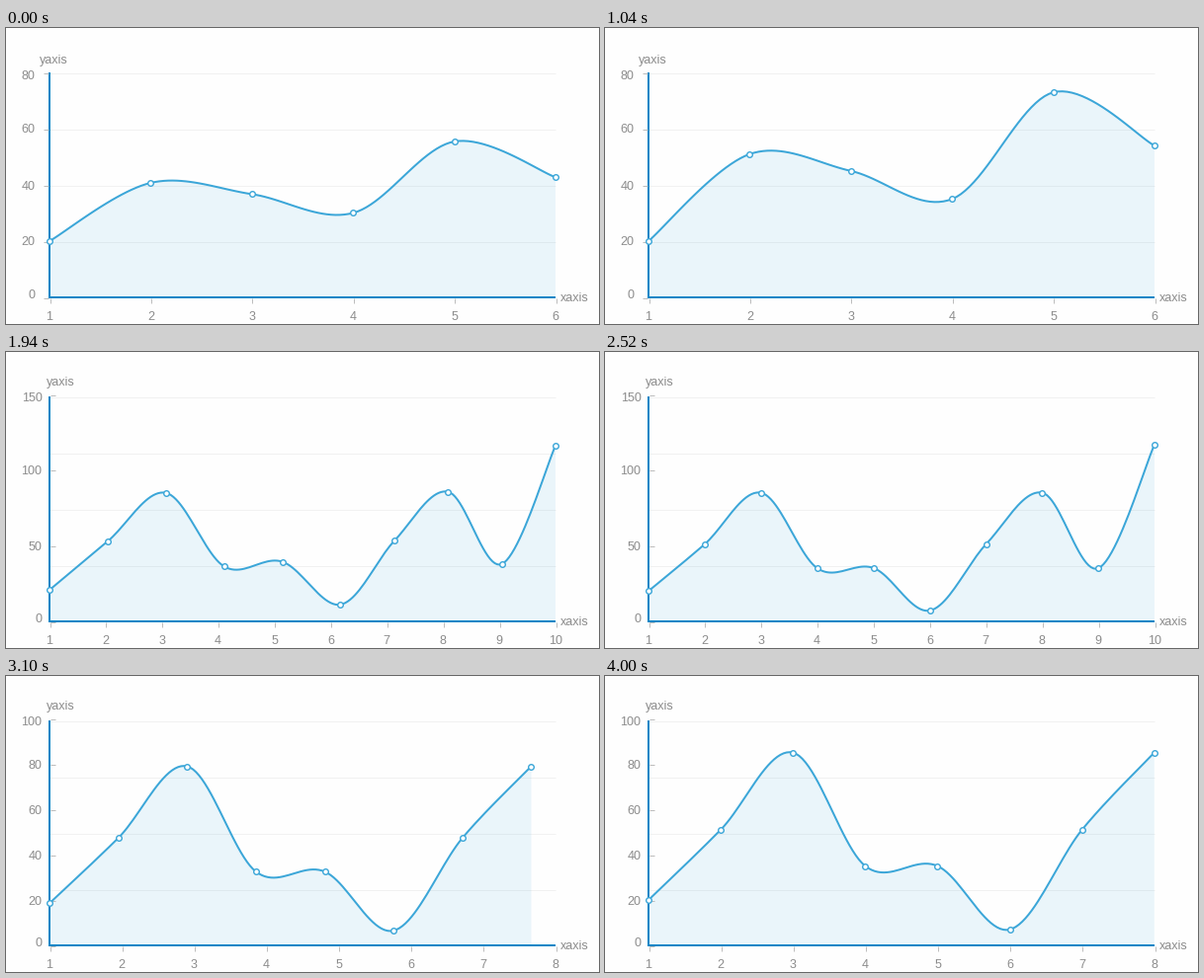
Recreate the animation shown at these times as a matplotlib script. Size 600 by 300 pixels, loop 5380 ms.

```python
import numpy as np
import matplotlib.pyplot as plt
from matplotlib.animation import FuncAnimation

W, H, DPI = 600, 300, 100
LOOP, INTERVAL = 5380, 20
LEFT, RIGHT, BASE = 44, 556, 273
STEP, DURATION = 148, 1338  # ms between redraws, ms of one transition
LINE, AXIS, TEXT, TICK, GRID = "#3ba6d8", "#0a86c6", "#8c8c8c", "#bdbdbd", "#f1f1f1"

# values, axis top value, label step, pixel of axis top, start, lead-in, redraws
CHARTS = [
    dict(values=[20, 51, 45, 35, 73, 54], top=80, step=20, top_y=45,
         start=0, lead=213, redraws=7),
    dict(values=[20, 51, 85, 35, 35, 7, 51, 85, 35, 117], top=150, step=50, top_y=43,
         start=1340, lead=11, redraws=8),
    dict(values=[20, 51, 85, 35, 35, 7, 51, 85], top=100, step=20, top_y=43,
         start=2810, lead=0, redraws=8),
]


def px(size):
    return size * 72 / DPI


def to_y(chart, value):
    return BASE - np.asarray(value) * (BASE - chart["top_y"]) / chart["top"]


def positions(chart):
    values = chart["values"]
    return np.column_stack([np.linspace(LEFT, RIGHT, len(values)), to_y(chart, values)])


def resize(points, count):
    """Cut the points, or repeat the last one, to reach the count."""
    return points[np.minimum(np.arange(count), len(points) - 1)]


def smooth(points, samples=24):
    """Catmull-Rom curve with doubled end points."""
    padded = np.vstack([points[:1], points, points[-1:]])
    tangents = (padded[2:] - padded[:-2]) / 2
    t = np.linspace(0, 1, samples)[None, :, None]
    a, b = points[:-1, None], points[1:, None]
    ma, mb = tangents[:-1, None], tangents[1:, None]
    curve = (a * (2 * t**3 - 3 * t**2 + 1) + ma * (t**3 - 2 * t**2 + t)
             + b * (3 * t**2 - 2 * t**3) + mb * (t**3 - t**2))
    return curve.reshape(-1, 2)


def ease_out(x):
    return 1.0 if x >= 1 else 1 - 2 ** (-10 * x)


plt.rcParams["font.family"] = "Liberation Sans"
fig = plt.figure(figsize=(W / DPI, H / DPI), dpi=DPI, facecolor="#fefefe")
ax = fig.add_axes([0, 0, 1, 1])
ax.set_xlim(0, W)
ax.set_ylim(H, 0)
ax.axis("off")


def segment(x, y, color, width, z):
    return ax.plot(x, y, color=color, lw=px(width), zorder=z, solid_capstyle="butt")[0]


def label(x, y, text, align):
    return ax.text(x, y, text, color=TEXT, fontsize=px(12.5), ha=align, va="baseline")


def build_scale(index, chart):
    """Ticks and labels belonging to one chart."""
    inside = index > 0
    tick_x = (45, 50) if inside else (38, 43)
    label_x = 36.5 if inside else 29.5
    artists = [label(41 if inside else 34, 34 if inside else 36, "yaxis", "left")]
    for value in range(0, chart["top"] + 1, chart["step"]):
        y = float(to_y(chart, value))
        artists.append(segment(tick_x, (int(y) + 0.5,) * 2, TICK, 1, 6))
        shift = {0: -3, chart["top"]: 3}.get(value, 0)
        artists.append(label(label_x, y + shift + 4.5, str(value), "right"))
    for i, x in enumerate(positions(chart)[:, 0]):
        artists.append(segment((int(x) + 0.5,) * 2, (274, 279), TICK, 1, 3))
        artists.append(label(x, 296, str(i + 1), "center"))
    return artists


for grid_y in (45, 102, 159, 216):
    segment((LEFT, RIGHT), (grid_y + 0.5,) * 2, GRID, 1, 1)
segment((LEFT, LEFT), (45, 274), AXIS, 2, 4)
segment((43, RIGHT), (BASE, BASE), AXIS, 2, 4)
label(561, 277, "xaxis", "left")
scales = [build_scale(i, chart) for i, chart in enumerate(CHARTS)]

area = ax.fill([0, 0, 1], [0, 1, 1], color=LINE, alpha=0.1, lw=0, zorder=2)[0]
curve_line = segment([], [], LINE, 2, 7)
markers = ax.plot([], [], "o", ms=px(5.6), mfc="white", mec=LINE, mew=px(1.4), zorder=8)[0]

ends = [positions(chart) for chart in CHARTS]
flat = np.column_stack([ends[0][:, 0], np.full(len(ends[0]), ends[0][0, 1])])
starts = [resize(before, len(after)) for before, after in zip([flat] + ends, ends)]


def update(frame):
    now = frame * INTERVAL + INTERVAL / 2
    index = max(i for i, chart in enumerate(CHARTS) if now >= chart["start"])
    chart = CHARTS[index]
    redraw = min(int((now - chart["start"]) / STEP), chart["redraws"])
    progress = ease_out((redraw * STEP + chart["lead"]) / DURATION)
    points = starts[index] + (ends[index] - starts[index]) * progress

    curve = smooth(points)
    curve_line.set_data(curve[:, 0], curve[:, 1])
    markers.set_data(points[:, 0], points[:, 1])
    area.set_xy(np.vstack([curve, [curve[-1, 0], BASE], [curve[0, 0], BASE]]))
    for i, artists in enumerate(scales):
        for artist in artists:
            artist.set_visible(i == index)
    return [area, curve_line, markers]


anim = FuncAnimation(fig, update, frames=LOOP // INTERVAL, interval=INTERVAL,
                     repeat=True, repeat_delay=0)
plt.show()
```
